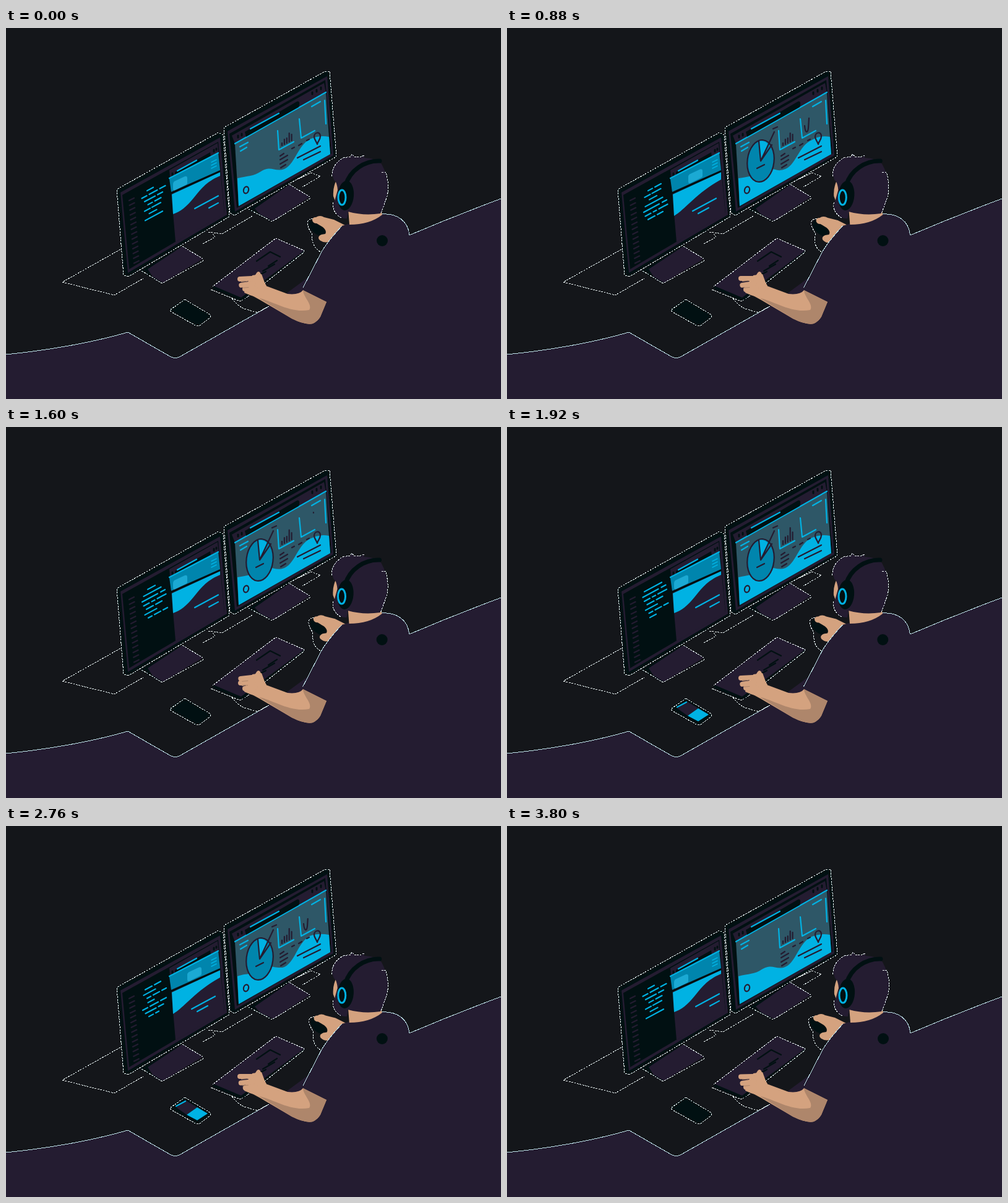
Recreate the animation shown at these times as an HTML page. Size 800 by 600 pixels, loop 3840 ms.

```html
<!DOCTYPE html>
<html lang="en">
<head>
<meta charset="utf-8">
<title>Developer at a desk</title>
<style>
html, body { margin: 0; width: 100%; height: 100%; overflow: hidden; background: #14161a; }
svg { display: block; width: 800px; height: 600px; }
path, ellipse, circle { fill: none; }
.p { fill: #241c31; } .d { fill: #011012; } .c { fill: #00b2e3; } .b { fill: #0085ad; }
.t { fill: #2e5767; } .s { fill: #d4a27f; } .sh { fill: #ae866b; } .card { fill: #1ba9d3; }
.lp, .lc, .ld { stroke-width: 2.2; stroke-linecap: round; stroke-linejoin: round; }
.lp { stroke: #241c31; } .lc { stroke: #00b2e3; } .ld { stroke: #011012; }
.thin { stroke-width: 1.6; } .wide { stroke-width: 3; } .band { stroke-width: 7; }
.e, .f { stroke-width: 1; shape-rendering: crispEdges; }
.e { stroke: #f2ffff; stroke-dasharray: 3 1.5; }
.f { stroke: #bfe3ea; }
</style>
</head>
<body>
<svg viewBox="0 0 800 600">
  <!-- desk -->
  <path class="p" d="M0 528Q110 517 197 492L265 531Q274 536 282 531L425 450L520 380L652 335Q725 304 800 276V600H0Z"/>
  <path class="f" d="M0 528Q110 517 197 492L265 531Q274 536 282 531L425 450M652 335Q725 304 800 276"/>
  <path class="e" d="M185 358L91 411L175 432L222 405M318 349L338 338L334 333M327 330L349 333L400 303M460 250L493 234L508 240L479 257"/>

  <!-- left monitor -->
  <path class="d" d="M179 261L343 169Q348 167 351 173L361 305L198 402L190 400Z"/>
  <path class="e" d="M198 402L190 400L179 261L343 169L351 173L361 305L198 402"/>
  <path class="p" d="M185 266L346 177L357 302L197 396Z"/>
  <path class="d" d="M188 270L343 184L353 299L199 390Z"/>
  <path class="p" d="M264 230L342 186L353 300L274 346Z"/>
  <path class="d" d="M273 233L330 201L331 208L273 239Z"/>
  <path class="lc" d="M277 231L308 214"/>
  <path class="ld wide" d="M269 235v3M336 197v3M340 195v2"/>
  <path class="b" d="M264 244L343 202L346 230L267 265Z"/>
  <path class="lc" d="M264 243L343 202"/>
  <path id="card" class="card" d="M270 252Q270 250 272 248L289 240Q293 239 293 243V251Q293 253 290 254L274 262Q270 264 270 260Z"/>
  <path class="lc thin" d="M332 217L340 213M332 222L340 218M332 227L340 223"/>
  <path id="wave1" class="c"/>
  <path class="ld wide" d="M267 267L345 232"/>
  <path id="copy" class="lc"/>
  <path id="gutter" class="lp"/>
  <path id="code" class="lc"/>
  <path class="d" d="M218 392L229 386L262 366L285 352L292 356L252 405L252 413Z"/>
  <path class="p" d="M229 390L285 353L318 373L252 413L240 407Z"/>
  <path class="ld thin" d="M219 393L252 412"/>
  <path class="e" d="M285 353L318 373L318 377L252 413L218 392"/>

  <!-- right monitor -->
  <path class="d" d="M352 161L516 70Q521 67 524 72L534 208L369 303L362 299Z"/>
  <path class="e" d="M369 303L362 299L352 161L516 70L523 70L534 208L369 303"/>
  <path class="p" d="M358 167L519 78L529 206L370 297Z"/>
  <path class="d" d="M361 171L516 84L526 203L373 291Z"/>
  <path class="p" d="M365 174L514 89L517 105L370 187Z"/>
  <path class="t" d="M370 188L517 105L524 204L376 288Z"/>
  <path class="lc" d="M370 187L517 104"/>
  <path class="d" d="M386 168L470 119Q475 117 474 125L473 128L388 176Z"/>
  <path class="lc" d="M395 163L441 138"/>
  <path class="ld wide" d="M375 174v3M381 171v3M495 104v3M502 100v3M509 96v3"/>
  <path id="wave2" class="c"/>
  <path class="lc" d="M378 192L391 185M379 199L389 193M494 127L508 119M515 117L517 155"/>
  <path class="lc" d="M439 166L441 197L465 184M474 147L477 178L499 166"/>
  <path id="bars" class="lp"/>
  <path id="trend" class="lp" pathLength="100" d="M481 158C482 170 486 171 487 162L488 146C489 136 492 139 493 144C494 149 496 146 497 138"/>
  <path class="lp" d="M443 207L449 203M443 213L455 206M443 220L455 213M444 226L452 221M462 195L466 193M473 190L478 187M486 182L490 180"/>
  <path class="lp" d="M471 210L508 191M481 213L508 200"/>
  <path class="lp" d="M503 188C501 182 498 180 498 176C498 168 508 167 508 175C508 181 504 183 503 188Z"/>
  <ellipse class="lp" cx="388" cy="262" rx="4" ry="5.5" transform="rotate(15 388 262)"/>
  <g id="pie">
    <ellipse class="b lp" rx="21.5" ry="34" transform="rotate(7)"/>
    <path class="c" d="M0 0L-3 -32Q6 -34 13 -26Z"/>
    <path class="lp" d="M-3 -32L0 0L22 -47M0 0L18 -26M20 -52L27 -55M-6 12L6 6"/>
  </g>
  <path class="d" d="M392 293L446 260L458 252L466 257L430 305L430 313Z"/>
  <path class="p" d="M402 292L458 253L491 273L430 313L414 305Z"/>
  <path class="ld thin" d="M393 294L430 312"/>
  <path class="e" d="M458 253L491 273L491 276L430 313L392 293"/>

  <!-- keyboard -->
  <path class="e" d="M331 423L378 442L390 435M365 437Q374 450 388 455L406 460L425 450"/>
  <path class="d" d="M334 419L436 340L482 360L481 363L384 439L378 441L335 422Z"/>
  <path class="p" d="M335 417L436 340L482 360L380 436Z"/>
  <path class="e" d="M390 435L481 363L482 360L436 340L334 418"/>
  <path class="ld" d="M405 377L427 362L443 370M424 385L438 376M415 393L434 382M408 400L420 394"/>

  <g id="phone">
    <path class="d" d="M265 456Q265 453 269 451L285 440Q289 438 293 441L329 463Q333 466 329 469L314 480Q310 483 306 481L268 459Z"/>
    <path class="e" d="M289 439L329 463Q333 466 329 469L312 482L306 481L267 459L265 456L289 439"/>
    <g id="screen">
      <path class="p" d="M275 455L291 444L309 455L292 467Z"/>
      <path class="c" d="M292 467L309 455L326 465L309 476Z"/>
      <path class="lc" d="M275 453L290 445"/>
    </g>
  </g>

  <!-- mouse and right hand -->
  <path id="cable" class="e"/>
  <g id="mouse">
    <ellipse class="d" cx="504" cy="323" rx="17" ry="10" transform="rotate(40 504 323)"/>
    <path class="s" d="M495 311Q495 306 501 306Q507 302 514 306L530 310L550 320L521 346Q512 348 506 342Q503 337 510 334L516 333Q519 328 512 322L502 316Q496 316 495 311Z"/>
  </g>

  <!-- person -->
  <g id="body">
    <path class="p" d="M553 317L543 320Q520 345 510 362L480 423L518 443L652 443V335C650 312 632 299 606 301Z"/>
    <path class="f" d="M606 301C632 299 650 312 652 335M543 320Q520 345 510 362L480 420"/>
    <circle class="d" cx="608" cy="344" r="9"/>
  </g>
  <path class="s" d="M400 434L411 440L462 470Q484 481 496 478Q504 474 508 467L518 443L480 424Q474 432 455 430L420 417L413 398L398 400L388 428Z"/>
  <path class="sh" d="M409 437C430 441 460 462 490 456C496 447 480 435 480 424L518 443L508 467Q504 474 496 478Q484 481 462 470Z"/>
  <path class="s" d="M385 428Q388 407 400 404L405 396Q408 392 411 396L414 405L421 417L412 437L394 432Z"/>
  <path id="fingers" stroke="#d4a27f" stroke-width="8" stroke-linecap="round"/>
  <path id="creases" stroke="#ae866b" stroke-width="1"/>
  <g id="head">
    <path class="s" d="M553 292L605 290L608 302Q588 318 555 318Z"/>
    <path class="s" d="M534 246Q528 258 529 272L535 288L548 290V246Z"/>
    <path class="p" d="M527 236Q527 219 545 210Q560 206 578 210Q598 210 607 220Q616 236 617 255Q616 285 605 300Q578 304 553 297L551 308Q536 309 530 293Q527 285 531 280L536 262Q535 249 530 246Z"/>
    <path class="p" d="M556 211L559 204L564 210ZM572 211L579 206L579 212ZM606 234L614 233L613 238Z"/>
    <path class="e" d="M545 210L557 208L559 204L564 209L574 208L579 206M607 233L614 233Q620 255 616 272L606 300M527 240Q526 221 545 210M529 282Q526 298 543 308"/>
    <path class="ld band" d="M549 254C556 230 580 214 604 215"/>
    <ellipse class="d" cx="549" cy="271" rx="13" ry="24" transform="rotate(5 549 271)"/>
    <ellipse class="lc wide" cx="543" cy="274" rx="6" ry="12"/>
  </g>
</svg>
<script>
const LOOP = 3840, HALF = LOOP / 2;
const $ = id => document.getElementById(id);
const ease = x => { x = Math.min(1, Math.max(0, x)); return x * x * (3 - 2 * x); };
const ramp = (t, a, b) => ease((t - a) / (b - a));
const mix = (a, b, k) => a + (b - a) * k;
const put = (id, d) => $(id).setAttribute('d', d);
const move = (id, x, y) => $(id).setAttribute('transform', `translate(${x} ${y})`);

function keys(t, ...k) {
  for (let i = 1; i < k.length; i++) {
    const [t0, v0] = k[i - 1], [t1, v1] = k[i];
    if (t <= t1) return mix(v0, v1, ramp(t, t0, t1));
  }
  return k[k.length - 1][1];
}

// A line of text on the left screen, following its tilt.
const line = (x, y, w) => `M${x} ${y}l${w} ${-0.54 * w}`;

// Runs of each code row, as start-end distances from the left edge.
const ROWS = ['9-19', '0-8 12-25 29-38', '4-21 25-33', '9-16 20-30', '3-12 15-29', '10-22',
  '3-31', '0-25 30-37', '2-11 15-20 24-38', '6-17 21-31', '3-22', '8-14 18-28 32-39'];
const runs = ROWS.map(r => r.split(' ').map(s => s.split('-').map(Number)));

function drawCode(t) {
  const step = LOOP / ROWS.length, n = Math.floor(t / step), k = t / step - n;
  const up = ease(k / 0.35);
  let d = '';
  for (let r = 0; r < 8; r++) {
    const slot = r - up;
    if (slot < -0.3) continue;
    const limit = r < 7 ? 40 : 40 * k;
    for (const [a, b] of runs[(n + r) % runs.length]) {
      const end = Math.min(b, limit);
      if (end > a) d += line(219 + a + slot * 0.5, 268 + slot * 7.5 - a * 0.54, end - a);
    }
  }
  put('code', d);
}

function drawPage(p) {
  const q = ramp(p, 400, 800) - ramp(p, 1290, 1480);
  move('card', 23 * q, -11.5 * q);
  put('wave1', `M268 269L346 233V${mix(239, 245, q)}C${mix(325, 322, q)} ${mix(248, 258, q)} ` +
    `${mix(316, 306, q)} ${mix(259, 273, q)} ${mix(304, 294, q)} ${mix(274, 284, q)}` +
    `S${mix(282, 279, q)} ${mix(297, 298, q)} 270 ${mix(301, 304, q)}Z`);
  put('copy', line(mix(305, 300, q), mix(292, 296, q), 38) +
    line(mix(328, 309, q), mix(291, 300, q), mix(15, 17, q)));
}

function drawCharts(t, p) {
  const size = ramp(t, 240, 760) * (1 - ramp(t, 3160, 3640));
  $('pie').setAttribute('transform', `translate(410 215) scale(${size})`);
  $('pie').style.display = size ? '' : 'none';
  const w = 2 * Math.sin(2 * Math.PI * t / LOOP);
  put('wave2', `M374 243C391 ${239 + w} 400 ${240 - w} 412 ${232 + w}C428 ${222 - w} 432 ${232 + w} 447 229` +
    `C467 224 471 ${188 + w} 493 ${179 + w}Q507 173 522 176L524 204L376 288Z`);
  const grow = ramp(t, 1300, 1900) * (1 - ramp(t, 2300, 3300));
  put('bars', [4, 8, 8, 14, 10].map((h, i) => {
    const x = 446 + i * 3.9, y = 190 - i * 2;
    return `M${x} ${y}v${-h - grow * (i === 3 ? 7 : 2)}`;
  }).join(''));
  const a = 100 * ramp(p, 860, 1650), b = 100 * ramp(p, 420, 1250);
  const trend = $('trend').style;
  trend.strokeDasharray = `${Math.max(0.01, b - a)} 200`;
  trend.strokeDashoffset = -a;
  trend.display = b - a > 0.5 ? '' : 'none';
}

function drawPerson(t) {
  const sway = -0.5 * (1 - Math.cos(2 * Math.PI * t / 1280));
  move('head', sway, 0);
  move('body', sway * 0.7, 0);
  const m = keys(t, [0, 0], [880, 4.5], [1280, 1.5], [1920, 2], [2760, 2.5], [3400, 0], [LOOP, 0]);
  move('mouse', m, m * 0.2);
  put('cable', `M${497 + m} 309Q${488 + m} 308 ${487 + m} 315Q${488 + m} 324 ${494 + m} 332Q494 354 508 362`);
  const tap = i => 1.5 * Math.sin(2 * Math.PI * (t / 480 + i / 3));
  const tips = [[378, 406], [379, 415], [386, 423]].map(([x, y], i) => [x + Math.max(0, tap(i)), y + tap(i) * 0.7]);
  put('fingers', tips.map(([x, y], i) => `M${x} ${y}L${397 + i * 3} ${405 + i * 8}`).join(''));
  put('creases', tips.slice(0, 2).map(([x, y]) => `M${x + 2} ${y + 4.5}l10 -1`).join(''));
}

function drawPhone(t) {
  const shake = t > 1600 && t < 1840 ? Math.sin((t - 1600) * Math.PI / 40 + 0.8) * 1.5 : 0;
  move('phone', shake, shake * 0.6);
  $('screen').style.opacity = ramp(t, 1640, 1720) * (1 - ramp(t, 3560, 3660));
}

put('gutter', Array.from({ length: 14 }, (_, i) => `M${199 + i * 0.6} ${279 + i * 7.8}l8 -4`).join(''));

function draw(now) {
  const t = now % LOOP, p = t % HALF;
  drawCode(t);
  drawPage(p);
  drawCharts(t, p);
  drawPerson(t);
  drawPhone(t);
}

let start;
function tick(now) {
  start ??= now;
  draw(now - start);
  requestAnimationFrame(tick);
}
draw(0);
requestAnimationFrame(tick);
</script>
</body>
</html>
```
